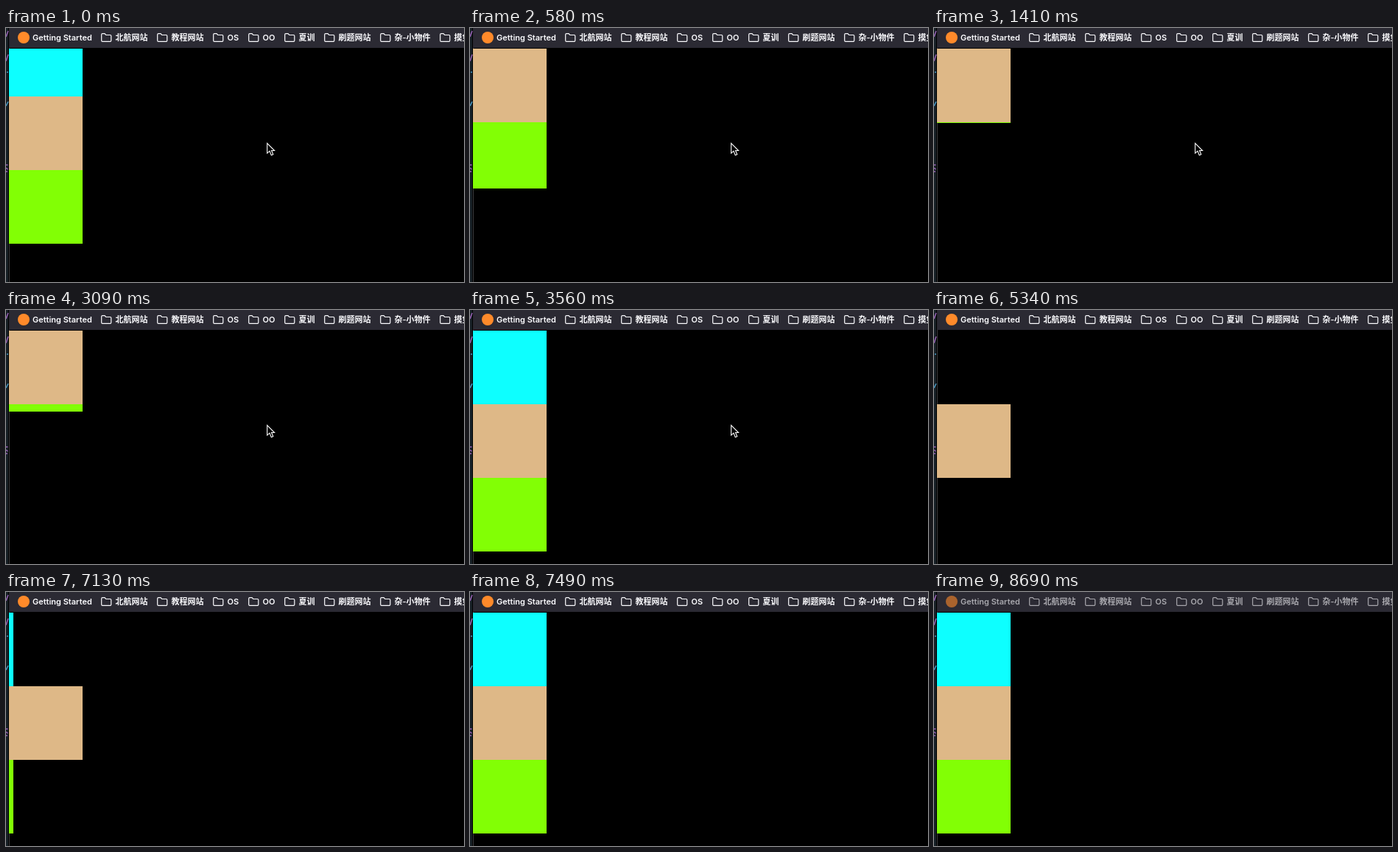
Animation, 622 px wide and 345 px high, one loop 8710 ms. Source, as an HTML page:

```html
<!DOCTYPE html>
<html lang="zh">
<head>
<meta charset="utf-8">
<style>
  html, body { margin: 0; height: 100%; overflow: hidden; background: #000; }
  svg { display: block; }
  text { font: 600 11px Inter, "Noto Sans CJK SC", "Noto Sans CJK", sans-serif; fill: #fbfbfe; }
</style>
</head>
<body>
<svg width="622" height="345" viewBox="0 0 622 345">
  <rect width="3" height="345" fill="#172026"/>
  <g fill="none" stroke="#9a62b8" stroke-width="1.5">
    <path d="M0 12L3 4M0 45L3 36M0 186h2.500M0 190l2.500 2M0 195h2"/>
    <path d="M1 60h2M0 106l3-6" stroke="#4a9cc8"/>
  </g>
  <rect x="4" width="1" height="345" fill="#3a3a3c"/>
  <rect x="4" width="618" height="27" fill="#2b2a33"/>
  <g id="bar">
    <circle cx="24" cy="13" r="8" fill="#ff8a2a"/>
    <text x="36" y="17">Getting Started</text>
    <g id="folders"></g>
  </g>
  <rect id="top" x="4" y="28" fill="#0dffff"/>
  <rect id="mid" x="4" width="100" height="100" fill="#deb887"/>
  <rect id="low" x="4" fill="#82ff05"/>
  <path id="mouse" d="M.7 1V14.600L4 11.600 6.300 17.300 8.800 16.200 6.600 11H10.600Z" fill="#000" stroke="#fff" stroke-width="1.1"/>
</svg>
<script>
const LOOP = 8710, SIZE = 100;
const el = id => document.getElementById(id);

const labels = [[129, "北航网站"], [205, "教程网站"], [281, "OS"], [329, "OO"],
  [378, "夏训"], [432, "刷题网站"], [508, "杂-小物件"], [589, "摸鱼"]];
el("folders").innerHTML = labels.map(([x, name]) => `
  <path transform="translate(${x} 7)" fill="none" stroke="#fbfbfe" stroke-width="1.2"
    d="M.7 2Q.7.700 2 .7H5L6.700 2.500H12.500Q13.800 2.500 13.800 3.800V10Q13.800 11.300 12.500 11.300H2Q.7 11.300.7 10Z"/>
  <text x="${x + 19.5}" y="17">${name}</text>`).join("");

// The screen refreshes only in these bursts: first time, last time, number of refreshes
const bursts = [[0, 930, 9], [1170, 1530, 4], [3090, 3560, 5], [3910, 4030, 2],
  [4870, 5340, 5], [7130, 7490, 4], [7850, 8450, 6], [8690, 8690, 1]];
function refreshed(t) {
  const [from, to, n] = bursts.filter(b => b[0] <= t).pop();
  const step = (to - from) / (n - 1 || 1);
  return from + Math.min(n - 1, Math.floor((t - from + 4) / step)) * step;
}

const swing = (t, start, span) => {
  const p = Math.min(1, Math.max(0, (t - start) / span));
  return (1 - Math.cos(Math.PI * p)) / 2;
};

function setBox(id, y, w, h) {
  const box = el(id);
  box.setAttribute("y", y);
  box.setAttribute("width", w);
  box.setAttribute("height", h);
}

function mouseAt(t) {
  if (t < 3900) return [354, 155.5];
  if (t < 4020) return [364, 191.5];
  if (t < 7840 || t > 8440) return null;
  const p = (t - 7850) / 480;
  return [482 + 127 * p, 330 - 144 * p];
}

function draw(now) {
  const t = refreshed(now % LOOP);
  const topH = SIZE * (1 - swing(t, -241, 600) + swing(t, 3255, 200));
  const lowH = SIZE * (1 - swing(t, 355, 1110) + swing(t, 3049, 200));
  const w = SIZE * (1 - swing(t, 4820, 450) + swing(t, 7067, 400));
  const midY = Math.round(28 + topH);
  setBox("top", 28, w, midY - 28);
  setBox("mid", midY, SIZE, SIZE);
  setBox("low", midY + SIZE, w, Math.round(lowH));

  const at = mouseAt(t);
  el("mouse").style.display = at ? "" : "none";
  if (at) el("mouse").setAttribute("transform", `translate(${at})`);

  el("bar").setAttribute("opacity", t > 8600 ? 0.6 : 1);
}

let begin;
function loop(now) {
  begin ??= now;
  draw(now - begin);
  requestAnimationFrame(loop);
}
requestAnimationFrame(loop);
</script>
</body>
</html>
```
